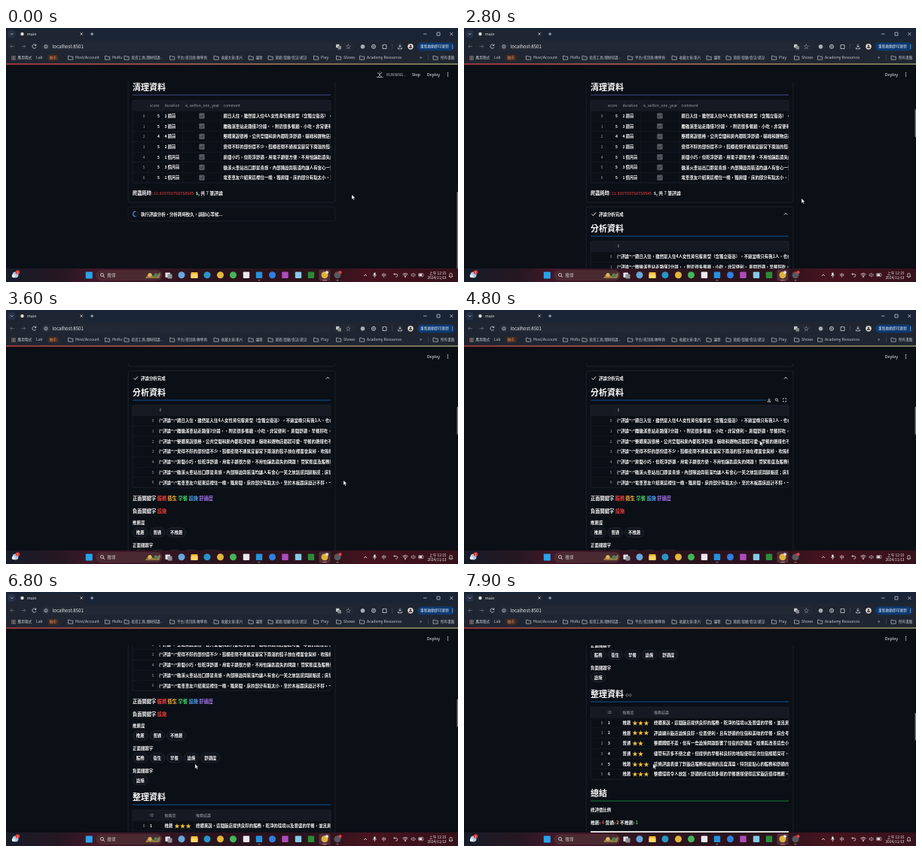
An HTML page for the animation above (8 s loop, 600 px wide and 338 px high).

```html
<!DOCTYPE html>
<html>
<head>
<meta charset="utf-8">
<style>
html, body { margin: 0; width: 100%; height: 100%; overflow: hidden; background: #0b0f16; }
svg { display: block; width: 100%; height: 100%; }
text { font-family: "Noto Sans CJK TC", "Noto Sans CJK", "Noto Sans CJK JP", "Noto Sans", sans-serif; white-space: pre; }
</style>
</head>
<body>
<svg id="stage" viewBox="0 0 600 338"></svg>
<script>
const WHITE = '#fafafa', GRAY = '#a0a2a9', EDGE = '#2b2e36', PAGE = '#0b0f16', BAR = '#1f2631';
const RED = '#f0413f', ORANGE = '#ffb43c', GREEN = '#3dc864', BLUE = '#55a8f5', VIOLET = '#a878f0';

// Drawing helpers; text is placed by its vertical centre.
const text = (x, y, s, size, fill = WHITE, extra = '') =>
  `<text x="${x}" y="${y + size * .38}" font-size="${size}" fill="${fill}" ${extra}>${s}</text>`;
const bold = (x, y, s, size, fill = WHITE, extra = '') => text(x, y, s, size, fill, 'font-weight="700" ' + extra);
const rect = (x, y, w, h, fill, r = 0, stroke = 'none') =>
  `<rect x="${x}" y="${y}" width="${w}" height="${h}" rx="${r}" fill="${fill}" stroke="${stroke}" stroke-width=".5"/>`;
const disc = (x, y, r, fill) => `<circle cx="${x}" cy="${y}" r="${r}" fill="${fill}"/>`;
const ring = (x, y, r, stroke, w) => `<circle cx="${x}" cy="${y}" r="${r}" fill="none" stroke="${stroke}" stroke-width="${w}"/>`;
const path = (d, stroke = '#d5d7da', w = .8, fill = 'none') =>
  `<path d="${d}" stroke="${stroke}" stroke-width="${w}" fill="${fill}"/>`;
const span = (s, fill) => `<tspan fill="${fill}">${s}</tspan>`;
const END = 'text-anchor="end"';

const ROW = 13.7, SMALL = 5.45, BODY = 6.25;
const reviews = [
  '週日入住，雖然是入住4人女性背包客房型（含獨立衛浴），不過當晚只有我1人，也在',
  '離礁溪車站走路僅3分鐘，，附近很多餐廳、小吃，非常便利。 房間舒適，早餐好吃，',
  '整體來說很棒，公共空間和房內都乾淨舒適，貓咪和選物店都超可愛~ 早餐的選擇也不',
  '覺得不好的部份還不少，鞋櫃密閉不通風宜蘭常下雨濕的鞋子放在裡面會臭掉、吹風機',
  '房間小巧，但乾淨舒適，用電子鎖很方便，不用怕鑰匙遺失的問題！ 管家態度及服務很',
  '礁溪火車站出口即是青旅，內部陳設與裝潢均讓人有會心一笑之放鬆感與歸屬感；床墊',
  '電車車友介紹來這裡住一晚，獨房間，床的部分有點太小，至於木板跟床設計不好，一'];
const verdicts = [
  '總體來說，這間飯店提供良好的服務，乾淨的環境以及豐盛的早餐，並且房',
  '評論顯示飯店設施良好，位置便利，且有舒適的住宿和美味的早餐，綜合考',
  '整體體驗不差，但有一些設施問題影響了住宿的舒適度，如果能改善這些小',
  '儘管有許多不便之處，但提供的早餐和良好的地點使得這次住宿經驗尚可，',
  '這條評論表達了對飯店服務和設施的高度滿意，特別是貼心的服務和舒適的',
  '整體環境令人放鬆，舒適的床位與多樣的早餐選擇使得這家飯店值得推薦。'];

const heading = (y, s, line) => bold(168, y, s, 11) + rect(168, y + 9.6, 263, .9, line);

function table(top, cols, heads, count, cells) {
  const h = ROW * (count + 1);
  let out = rect(168, top, 263, ROW, '#151921');
  for (let i = 1; i <= count; i++) out += rect(168, top + ROW * i, 263, .4, '#20242c');
  for (const x of cols) out += rect(x, top, .4, h, '#20242c');
  for (const [x, s] of heads) out += text(x, top + ROW / 2, s, 5, GRAY);
  for (let i = 0; i < count; i++) {
    const y = top + ROW * (i + 1.5);
    out += text(cols[0] - 3.5, y, i, 5, GRAY, END) + cells(i, y);
  }
  return `<g clip-path="url(#cell)">${out}</g>` + rect(168, top, 263, h, 'none', 2, EDGE);
}

function pills(y, names) {
  let x = 168.3;
  return names.map(s => {
    const w = s.length * SMALL + 9;
    const out = rect(x, y - 6.2, w, 12.4, '#10141c', 6.2, '#353841') + bold(x + 4.5, y, s, SMALL);
    x += w + 2.7;
    return out;
  }).join('');
}

const ages = ['2 週前', '3 週前', '4 週前', '2 週前', '1 個月前', '3 個月前', '1 個月前'];
const crawled =
  path('M162.2 0V229.5Q162.2 232 164.7 232H434.5Q437 232 437 229.5V0', EDGE, .6) +
  heading(79, '清理資料', '#46509c') +
  table(96.4, [188, 207, 234, 285],
    [[191, 'score'], [210.5, 'duration'], [237.5, 'is_within_one_year'], [288.5, 'comment']], 7,
    (i, y) => bold(204, y, i == 2 ? 4 : 5, 5, WHITE, END) + bold(210.5, y, ages[i], 5.2) +
      rect(256.3, y - 3.7, 7.4, 7.4, '#55585f', 1.3) + path(`M258 ${y}l1.5 1.6 2.7 -3`, '#1b1d24') +
      bold(288.5, y, reviews[i], SMALL)) +
  bold(168, 220, '爬蟲耗時', BODY) + text(193, 220, ': ', BODY) +
  text(196, 220, '11.839709758758545', 5.5, RED) + bold(252, 220, 's, 共 ' + span(7, '#bfc1c5') + ' 筆評論', 5.9);

const waiting = rect(162.2, 238, 274.8, 19, 'none', 2.5, EDGE) + ring(172, 247.5, 3.3, '#2a2d36', 1) +
  `<path id="spin" d="M172 244.2a3.3 3.3 0 0 0 -3.3 3.3a3.3 3.3 0 0 0 3.3 3.3" fill="none" stroke="#3d9df3" stroke-width="1.1"/>` +
  bold(179, 247.5, '執行評論分析，分析耗時較久，請耐心等候...', SMALL);

const analysed =
  path('M162.2 760V240.5Q162.2 238 164.7 238H434.5Q437 238 437 240.5V760', EDGE, .6) +
  path('M169.5 247.7l1.9 2 3.6 -4.2', WHITE, .9) + bold(179, 247.5, '評論分析完成', SMALL) +
  path('M425 248.5l2 -2 2 2', WHITE, .9) +
  heading(267, '分析資料', '#0b5aa6') +
  table(283.7, [200], [[203.5, '0']], 7, (i, y) => bold(203, y, '{"評論":"' + reviews[i], SMALL)) +
  bold(168, 408, '正面關鍵字 ' + span('服務 ', RED) + span('衛生 ', ORANGE) + span('早餐 ', GREEN) +
    span('設施 ', BLUE) + span('舒適度', VIOLET), BODY) +
  bold(168, 424.3, '負面關鍵字 ' + span('設施', RED), BODY) +
  bold(168, 440.2, '推薦度', SMALL) + pills(453, ['推薦', '普通', '不推薦']) +
  bold(168, 470, '正面關鍵字', SMALL) + pills(482.5, ['服務', '衛生', '早餐', '設施', '舒適度']) +
  bold(168, 500, '負面關鍵字', SMALL) + pills(512.5, ['設施']) +
  heading(535, '整理資料', '#0b5aa6') +
  table(552.3, [188, 207, 249], [[191, 'ID'], [210.5, '推薦度'], [252, '推薦結論']], 6, (i, y) => {
    const fair = i == 2 || i == 3;
    return bold(191, y, i + 1, 5) + bold(210.5, y, fair ? '普通' : '推薦', SMALL) +
      text(223.2, y, '★'.repeat(fair ? 2 : 3), 7.5, '#ffc233') + bold(252, y, verdicts[i], SMALL);
  }) +
  heading(667, '總結', '#178a3c') +
  bold(168, 689, '總評價比例', SMALL) +
  bold(168, 706, '推薦: ' + span('4', RED) + ' 普通: ' + span('2', ORANGE) + ' 不推薦: ' + span('1', GREEN), 5.8) +
  rect(168, 717.3, 263, 40, '#fff') +
  `<g id="tools">${rect(401, 271.5, 30, 11, PAGE, 1.5)}${
    path('M405 274.5v3.2m-1.5 -1.4l1.5 1.5 1.5 -1.5M403.2 278v1.2h3.6v-1.2', WHITE, .7)}${
    path('M416 277.5l1.7 1.7', WHITE)}${ring(414.8, 276.3, 1.5, WHITE, .7)}${
    path('M423.5 276v-1.3h1.3m1.4 0h1.3v1.3m0 1.7v1.3h-1.3m-1.4 0h-1.3v-1.3', WHITE, .7)}</g>` +
  `<g id="link">${path('M217.5 534.7h-1a1.5 1.5 0 0 0 0 3h1m2 -3h1a1.5 1.5 0 0 1 0 3h-1m-2.5 -1.5h3', '#a3a6ad', .7)}</g>`;

const folder = (x, y) => path(`M${x - 3} ${y - 2.3}h2.2l.8 .9h3.2v4h-6.2z`, '#c4c7cb', .7);
const marks = [[82, 'Most/Account'], [131, 'MoRu'], [156.5, '投資工具/理財知識...'], [217, '平台/資訊頁/教學頁'],
  [275.5, '收藏文章/影片'], [321.5, '課程'], [347.5, '旅遊/餐廳/食記/遊記'], [408, 'Play'], [438, 'Shows'], [469, 'Academy Resources']];

function browser() {
  const icon = '#d5d7da', faint = '#666b74', ink = '#c6cad0';
  let out = rect(0, 0, 600, 17, '#1a2437') + rect(0, 15.5, 600, 32.5, BAR) +
    rect(2.5, 3, 10, 10, '#273247', 3) + path('M6 7.2l1.7 1.7 1.7 -1.7', icon) +
    path('M13 16Q15.5 16 15.5 13V6Q15.5 3 18.5 3H103Q106 3 106 6V13Q106 16 108.5 16Z', 'none', 0, BAR) +
    disc(21.5, 8, 2.2, '#d9dbdd') + text(28, 8, 'main', 5.2, '#e6e8ea') +
    path('M98.5 6.3l3.2 3.2m0 -3.2l-3.2 3.2M112 8h4.4m-2.2 -2.2v4.4', icon) +
    path('M554 8h4.5M572 6h4v4h-4zM589.3 6l4 4m0 -4l-4 4', icon, .7) +
    path('M11 24.5H5.7m2.3 -2.3l-2.3 2.3 2.3 2.3M20.5 24.5h5.3m-2.3 -2.3l2.3 2.3 -2.3 2.3', faint) +
    path('M39.6 23a2.6 2.6 0 1 0 .3 2.5M39.9 21.5v2h-2', icon) +
    rect(46, 19, 417, 11.5, '#232934', 5.7) + disc(53, 24.7, 3.8, '#343b47') + ring(53, 24.7, 2, icon, .6) +
    path('M53 24.3v1.4M53 23.4v.4', icon, .6) + text(61.5, 24.4, 'localhost:8501', 6.1, '#eceef0') +
    rect(438, 21.7, 4.5, 4.5, '#c5c8cc', .7) + rect(440.5, 24, 4.5, 4.5, '#85898d', .7) +
    text(451, 24.5, '☆', 6.8, icon) +
    disc(473.5, 24.7, 2.8, '#a9adb1') + ring(488, 24.7, 2.6, icon, .8) +
    path('M488 22v5.4M485.5 24.7h5', icon, .5) + path('M500 22.5h2a1 1 0 0 1 1.7 0h1.3v5h-5z', icon) +
    rect(512.5, 21, .6, 7, '#4b525e') + path('M523 21.5v4m-1.8 -1.7l1.8 1.8 1.8 -1.8M520.5 26v1.8h5V26', icon) +
    disc(537, 24.7, 3.7, '#ece8e6') + disc(537, 23.7, 1.4, '#5b4a45') + path('M534.5 27a2.5 2.2 0 0 1 5 0z', 'none', 0, '#5b4a45') +
    rect(546, 19.3, 49.5, 11, '#0d3a72', 5.5) + text(550, 24.6, '重新啟動即可更新', 4.75, '#e4efff') +
    [22.7, 24.7, 26.7].map(y => disc(592.5, y, .55, '#d5e8ff')).join('');
  for (let i = 0; i < 9; i++) out += rect(7.3 + i % 3 * 2, 37.2 + (i / 3 | 0) * 2, 1.3, 1.3, ['#ef6b53', '#e5b842', '#64a6e8'][i % 3]);
  out += text(15.5, 39.4, '應用程式', 4.7, ink) + text(40, 39.4, 'Lab', 5, ink) +
    rect(55.5, 35.5, 14.5, 8.2, '#3c2a26', 1.5) + text(57.8, 39.4, '柚市', 4.8, '#f0945c');
  for (const [x, s] of marks) out += folder(x + 3.5, 39.5) + text(x + 10, 39.4, s, /^[A-Z]/.test(s) ? 5 : 4.55, ink);
  return out + text(549, 38.9, '»', 6.5, ink) + rect(560, 36, .5, 7, '#4b525e') + folder(570, 39.5) +
    text(577, 39.4, '所有書籤', 4.6, ink) + rect(0, 47.4, 600, 1.2, 'url(#deco)');
}

function taskbar() {
  const ink = '#eceef0';
  const apps = [[233, '#65a8dc'], [267, '#2795c9'], [284.5, '#e3b63d'], [301.5, '#43b658'], [319, '#ece9ee'],
    [336, '#2492dd'], [353.5, '#2f7fe0'], [370.5, '#b04bbd'], [388, '#86c9e8'], [405, '#278d35'], [423, '#e0b23c'], [440, '#55585f']];
  const square = [319, 336, 370.5, 388, 405];
  let out = rect(0, 320, 600, 18, 'url(#bar)') +
    disc(12.5, 328.5, 4, '#a9cbe8') + disc(10, 330, 2.3, '#e8ecf0') + disc(15.5, 325, 2.8, '#d83b3b') + text(14.3, 325, '1', 4, '#fff') +
    rect(105.8, 324.5, 9, 9, '#2aa3ea', .8) +
    rect(120, 322.7, 87, 12.8, '#4a2a30', 6.4, '#5c3a40') +
    ring(127.5, 328.5, 2, ink, .8) + path('M129 330l2 2', ink) +
    text(134.5, 328.9, '搜尋', 5.5, '#d8d5d7') +
    path('M185 333q4 -8 9 -4t10 -4q2 4 -1 8z', 'none', 0, '#9a7a41') + disc(191, 328.5, 2.6, '#d8b85a') + disc(199, 329, 2.7, '#527b5b') +
    rect(211.5, 325.5, 6.5, 6.5, '#e4e5e8', .7) + rect(214.5, 327.5, 6, 6, '#8d9096', .7) +
    rect(245.5, 325, 9, 8, '#f0b837', .8) + rect(245.5, 327.5, 9, 5.5, '#ffd766', .8) +
    rect(415.5, 321.5, 15, 15, '#50303a', 2);
  for (const [x, c] of apps) out += square.includes(x) ? rect(x - 4.2, 324.6, 8.4, 8.4, c, 1) : disc(x, 328.8, 4.5, c);
  out += rect(420, 335.3, 6, 1, '#e27a83', .5) + rect(334.5, 335.3, 3, .9, '#9a9296', .4) + rect(438.5, 335.3, 3, .9, '#9a9296', .4) +
    disc(443.5, 325.2, 2.1, '#e34141') + disc(426, 325.3, 2, '#e9dcd8');
  return out + path('M475 330l2 -2 2 2', ink) + rect(488.2, 325.4, 2.4, 4.2, ink, 1.2) + path('M487 328.5q2.4 4 4.8 0M489.4 330.6v1.7', ink, .6) +
    text(498.8, 328.7, '中', 6, ink) + path('M515 327.5h3a1.6 1.6 0 0 1 0 3.6h-.8M516.3 326l-1.5 1.5 1.5 1.5', ink, .7) +
    path('M526.5 327.8q3.5 -3 7 0M527.7 329.4q2.3 -2 4.6 0', ink) + disc(530, 331, .9, ink) +
    path('M538 327.7h1.3l1.7 -1.5v5l-1.7 -1.5H538z', ink, .5) + path('M542.5 327q1.5 1.7 0 3.4', ink, .6) +
    rect(547.5, 326.5, 6.5, 4.2, 'none', 1, ink) + rect(548.3, 327.3, 4, 2.6, ink) +
    text(584.5, 325.8, '上午 12:15', 4.8, ink, END) + text(584.5, 332.2, '2024/11/13', 4.8, ink, END) +
    path('M588 331h5l-.8 -1.2v-1.8a1.7 1.7 0 0 0 -3.4 0v1.8zM590 332h1', ink, .7);
}

document.getElementById('stage').innerHTML = `
<defs>
  <clipPath id="view"><rect x="0" y="71" width="600" height="249"/></clipPath>
  <clipPath id="cell"><rect x="168" y="0" width="263" height="800"/></clipPath>
  <linearGradient id="deco"><stop stop-color="#e8474a"/><stop offset=".5" stop-color="#d98a66"/><stop offset="1" stop-color="#b4bd78"/></linearGradient>
  <linearGradient id="bar">
    <stop stop-color="#161c28"/><stop offset=".12" stop-color="#261722"/><stop offset=".2" stop-color="#43182a"/>
    <stop offset=".45" stop-color="#2a141e"/><stop offset=".7" stop-color="#2c131c"/><stop offset=".8" stop-color="#46141f"/>
    <stop offset="1" stop-color="#35111a"/>
  </linearGradient>
</defs>
${rect(0, 0, 600, 338, PAGE)}
<g clip-path="url(#view)"><g id="doc">${crawled}<g id="wait">${waiting}</g><g id="done">${analysed}</g></g></g>
${browser()}
<g id="run">
  <path id="runner" fill="none" stroke="#c3c5ca" stroke-width=".8"/>
  ${text(505, 61.8, 'RUNNING...', 5, '#b5b8be')}${text(539, 61.8, 'Stop', 5.1)}
</g>
${text(559, 61.8, 'Deploy', 5.2)}${[59.7, 61.8, 63.9].map(y => disc(586.5, y, .65, WHITE)).join('')}
<rect id="thumb" x="598.6" width="1.4" fill="#7d8086"/>
${taskbar()}
<path id="mouse" d="M-1 -3.2v6.3l1.5 -1.3 1 2.2 1 -.45 -1 -2.2h1.9z" fill="#fff" stroke="#16181d" stroke-width=".35"/>`;

const $ = id => document.getElementById(id);
const show = (id, on) => $(id).setAttribute('visibility', on ? 'visible' : 'hidden');
const scrollKeys = [[2900, 0], [3100, 50], [3400, 145], [3500, 157], [5600, 157], [5700, 184], [5800, 217], [6000, 235],
  [6700, 235], [6800, 262], [7000, 300], [7200, 311], [7300, 314], [7600, 314], [7900, 399]];
const mouseKeys = [[0, 460, 225], [1900, 460, 225], [2300, 449, 230], [3800, 449, 230], [4100, 455, 205], [4500, 443, 166],
  [4700, 425, 168], [5100, 300, 205], [5500, 227, 236], [5900, 227, 236], [6400, 252, 232]];

function along(keys, t) {
  const i = keys.findIndex(k => k[0] > t);
  if (i == 0) return keys[0].slice(1);
  if (i < 0) return keys.at(-1).slice(1);
  const a = keys[i - 1], b = keys[i], u = (t - a[0]) / (b[0] - a[0]);
  return a.slice(1).map((v, n) => v + (b[n + 1] - v) * u);
}

function draw() {
  const t = Math.floor(performance.now() % 8000 / 100) * 100;
  const done = t >= 2400, [scroll] = along(scrollKeys, t), [x, y] = along(mouseKeys, t);
  $('doc').setAttribute('transform', `translate(0 ${-scroll})`);
  $('mouse').setAttribute('transform', `translate(${x} ${y})`);
  $('spin').setAttribute('transform', `rotate(${t * .36} 172 247.5)`);
  const k = t / 100 % 4 < 2 ? 1 : -1;
  $('runner').setAttribute('d', `M492 65.5h8.5M493 ${59 + k * .5}l3 2 3.5 ${-2 - k * .5}M496 60.5v2.5l${-2 * k} 2m${2 * k} -2l2.5 1.5M495.5 58.6h1`);
  $('thumb').setAttribute('y', done ? 108.3 + scroll * .132 : 218);
  $('thumb').setAttribute('height', done ? 36.5 : 102);
  show('wait', !done);
  show('run', !done);
  show('done', done);
  show('tools', t >= 4700 && t < 5900);
  show('link', t >= 7300);
  requestAnimationFrame(draw);
}
draw();
</script>
</body>
</html>
```
